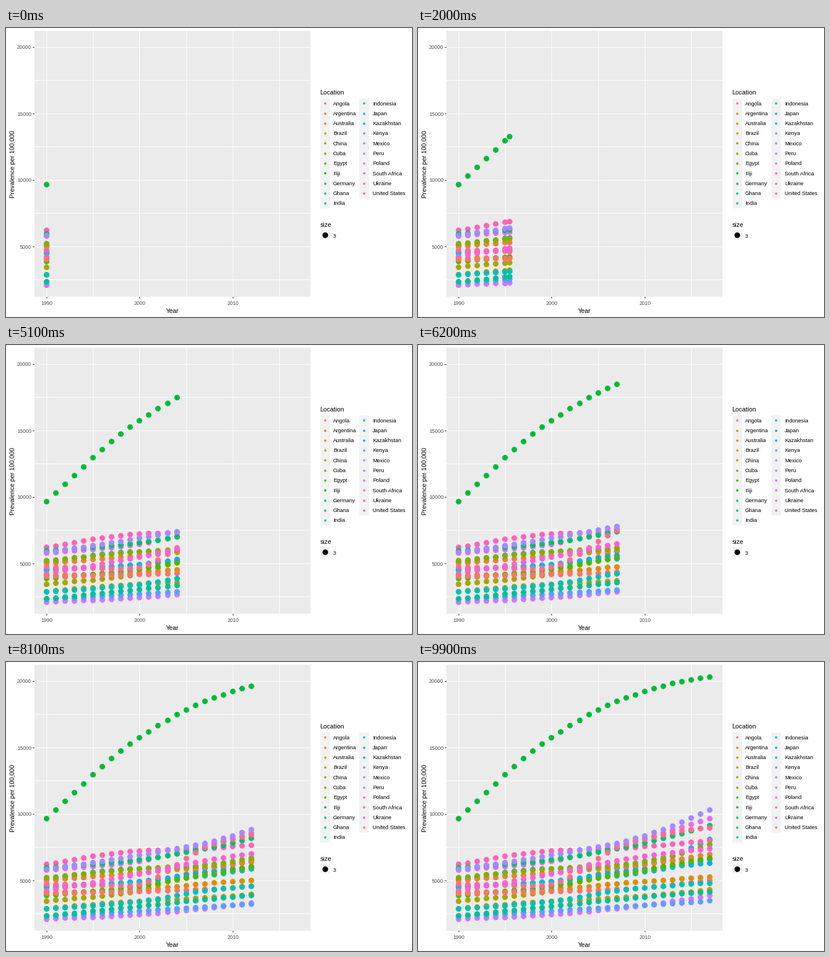
A matplotlib script that plays this animation: 700 by 500 pixels, repeating every 10000 ms.

```python
import matplotlib.pyplot as plt
import numpy as np
from matplotlib.animation import FuncAnimation
from matplotlib.patches import Rectangle

W, H, DPI = 700, 500, 100
FRAMES, INTERVAL, YEARS = 100, 100, 27
PT = 72 / DPI  # points per pixel
KEY, DOT = 17.28, 9.7

plt.rcParams["font.family"] = "Liberation Sans"

# Prevalence in 1990, 1999, 2008 and 2017, from back to front
TRENDS = {
    "China": (3450, 4080, 6060, 6600),
    "Kazakhstan": (4500, 4850, 5700, 6300),
    "Indonesia": (4560, 4870, 5450, 6600),
    "Brazil": (2890, 3400, 3720, 4300),
    "Australia": (4080, 4250, 4810, 5240),
    "Japan": (5080, 5860, 6000, 8080),
    "Ukraine": (6210, 7160, 7450, 8000),
    "Poland": (5780, 6350, 7800, 9650),
    "Peru": (2100, 2370, 2970, 3850),
    "Kenya": (2290, 2660, 3040, 3460),
    "Argentina": (4990, 5530, 6060, 6970),
    "Egypt": (3860, 4480, 5540, 6680),
    "Cuba": (5210, 5820, 6220, 7700),
    "Germany": (5950, 6480, 7520, 9130),
    "United States": (4720, 4600, 7720, 8950),
    "South Africa": (4230, 5330, 6600, 7390),
    "Angola": (4030, 4160, 4360, 5020),
    "India": (2870, 3330, 4300, 4800),
    "Ghana": (2330, 2970, 3620, 4140),
    "Mexico": (5810, 6780, 7970, 10300),
    "Fiji": (9650, 15250, 18740, 20300),
}
COUNTRIES = sorted(TRENDS)


def hue_color(i, n):
    """Evenly spaced hue i of n at chroma 100 and luminance 65 (CIE LUV)."""
    hue = np.radians(15 + 360 * i / n)
    lum, chroma = 65, 100
    y = ((lum + 16) / 116) ** 3
    u = chroma * np.cos(hue) / (13 * lum) + 0.1978398
    v = chroma * np.sin(hue) / (13 * lum) + 0.4683363
    x = 9 * y * u / (4 * v)
    z = -x / 3 - 5 * y + 3 * y / v
    to_rgb = np.array([[3.240479, -1.537150, -0.498535],
                       [-0.969256, 1.875992, 0.041556],
                       [0.055648, -0.204043, 1.057311]])
    rgb = np.clip(to_rgb @ (x, y, z), 0, 1)
    gamma = 1.055 * np.maximum(rgb, 0.0031308) ** (1 / 2.4) - 0.055
    return np.where(rgb > 0.0031308, gamma, 12.92 * rgb)


def smooth(ys, t):
    """Monotone cubic through evenly spaced ys, for t from 0 to 1."""
    ys = np.array(ys, float)
    d = np.diff(ys)
    prod = d[:-1] * d[1:]
    inner = np.divide(2 * prod, d[:-1] + d[1:],
                      out=np.zeros_like(prod), where=prod > 0)
    m = np.concatenate(([d[0]], inner, [1.5 * d[-1] - 0.5 * d[-2]]))
    t = t * len(d)
    k = np.minimum(t.astype(int), len(d) - 1)
    t = t - k
    bow = (m[k] - d[k]) * (1 - t) - (m[k + 1] - d[k]) * t
    return ys[k] + d[k] * t + t * (1 - t) * bow


def px(year):
    return np.round(70 + 16.04 * year)


def py(value):
    return np.round(493 - 0.023 * value)


COLORS = {c: hue_color(i, len(COUNTRIES)) for i, c in enumerate(COUNTRIES)}
years = np.arange(YEARS + 1)
values = np.array([smooth(row, years / YEARS) for row in TRENDS.values()])
palette = np.array([COLORS[name] for name in TRENDS])
key_frames = np.round(years * (FRAMES - 1) / YEARS)

fig = plt.figure(figsize=(W / DPI, H / DPI), dpi=DPI, facecolor="white")
ax = fig.add_axes([0, 0, 1, 1])
ax.set_xlim(0, W)
ax.set_ylim(H, 0)
ax.axis("off")


def box(x, y, w, h, color):
    ax.add_patch(Rectangle((x, y), w, h, fc=color, ec="none", lw=0))


def label(x, y, text, size=9, color="black", **kw):
    ax.text(x, y, text, fontsize=size * PT, color=color, va="baseline", **kw)


def dots(x, y, diameter, color):
    return ax.scatter(x, y, s=(diameter * PT) ** 2, c=color, linewidths=0,
                      zorder=3)


# Panel, grid and axes
box(49, 5, 476, 460, "#EBEBEB")
for i in range(4):
    y = 378 - 115 * i
    box(49, y, 476, 1, "white")
    box(49, y + 57, 476, 1, "white")
    box(46, y, 3, 1, "#333333")
    label(44, y + 3.5, str(5000 * (i + 1)), color="#4D4D4D", ha="right")
for year in range(0, 30, 5):
    x = px(year)
    box(x, 5, 1, 460, "white")
    if year % 10 == 0:
        box(x, 465, 1, 3, "#333333")
        label(x + 0.5, 479, str(1990 + year), color="#4D4D4D", ha="center")
label(287, 493, "Year", 11, ha="center")
label(15, 235.5, "Prevalence per 100,000", 11, ha="center", rotation=90,
      rotation_mode="anchor")

# Legends
label(541.5, 115, "Location", 11)
for i, name in enumerate(COUNTRIES):
    col, row = divmod(i, 11)
    x, y = 542 + 67 * col, 121.7 + KEY * row
    box(x, y, KEY, KEY, "#F2F2F2")
    dots([x + 8.2], [y + KEY / 2], 4, [COLORS[name]])
    label(x + 22 + col, round(y + KEY / 2 + 3.3), name, 9.4)
label(541.5, 344, "size", 11)
box(542, 349, KEY, KEY, "#F2F2F2")
dots([550], [358], DOT, ["black"])
label(564, 363, "3", 9.4)

points = dots([], [], DOT, None)


def update(frame):
    past = int(np.sum(key_frames < frame))
    xs = np.append(years[:past], np.interp(frame, key_frames, years))
    now = [np.interp(frame, key_frames, row) for row in values]
    ys = np.column_stack((values[:, :past], now))
    grid_x = np.repeat(px(xs), len(values))
    points.set_offsets(np.column_stack((grid_x, py(ys.T).ravel())))
    points.set_facecolor(np.tile(palette, (past + 1, 1)))
    points.set_sizes([(DOT * PT) ** 2])
    return (points,)


anim = FuncAnimation(fig, update, frames=FRAMES, interval=INTERVAL,
                     repeat=True, repeat_delay=0, blit=False)
plt.show()
```
